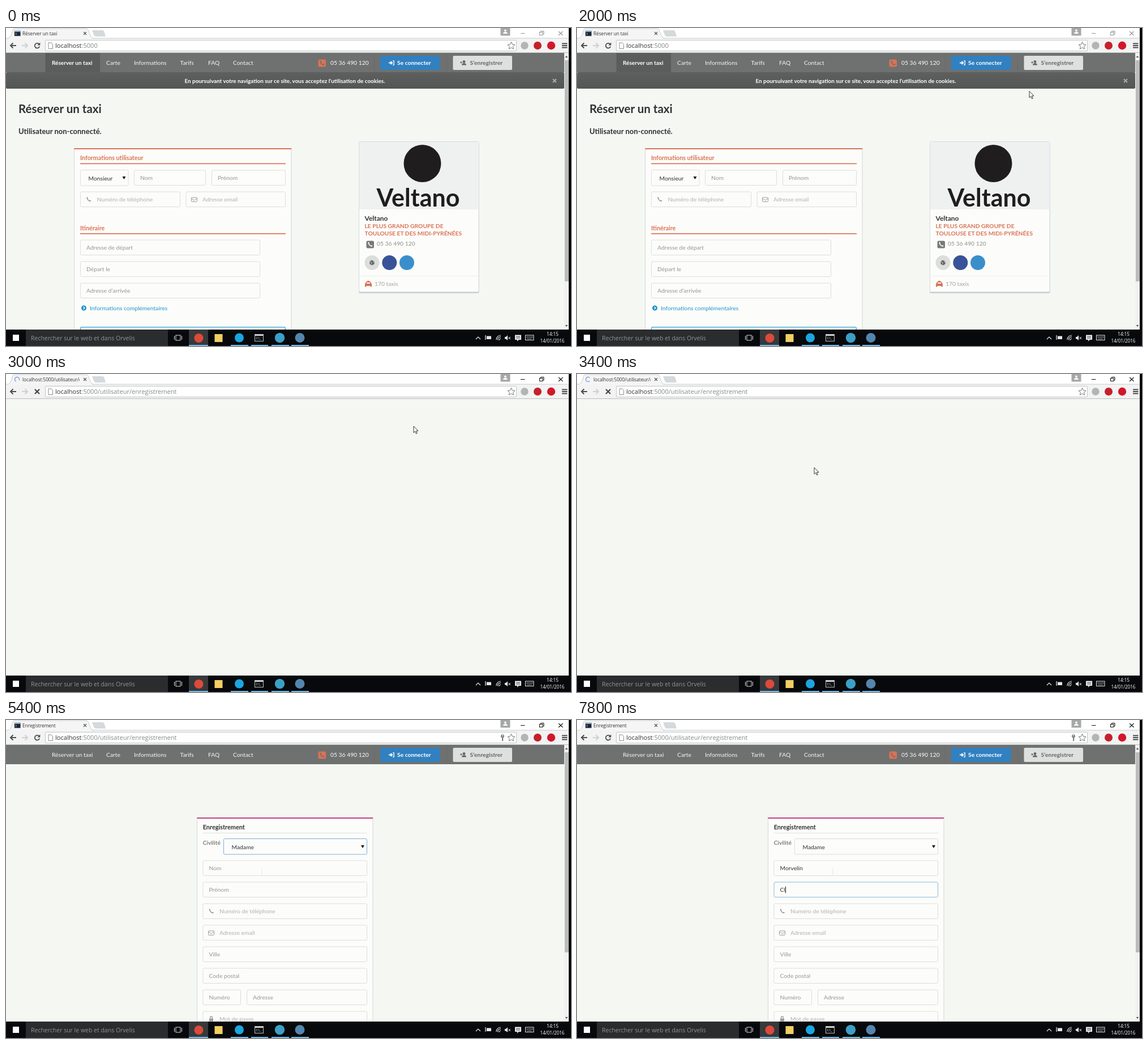
Animation, 998 px wide and 561 px high, one loop 8000 ms. Source, as an HTML page:

```html
<!DOCTYPE html>
<html lang="fr">
<head>
<meta charset="utf-8">
<style>
html, body { margin: 0; width: 100%; height: 100%; overflow: hidden; background: #000 }
svg { display: block; width: 998px; height: 561px }
text { font-family: Lato, sans-serif; font-size: 10.3px; white-space: pre }
.ui { font-family: "Open Sans", "Noto Sans", sans-serif }
.b { font-weight: 700 }
.m { text-anchor: middle }
.e { text-anchor: end }
</style>
</head>
<body>
<svg id="stage" viewBox="0 0 998 561">
  <defs>
    <clipPath id="view"><rect y="44" width="994" height="488"/></clipPath>
    <clipPath id="tabClip"><rect x="10" width="120" height="18"/></clipPath>
    <linearGradient id="bar" x2="0" y2="1"><stop stop-color="#5d605e"/><stop offset="1" stop-color="#535654"/></linearGradient>
  </defs>
  <g id="browser"></g>
  <g id="tools"></g>
  <g clip-path="url(#view)">
    <g id="booking"></g>
    <g id="register"></g>
    <g id="nav"></g>
    <g id="live"></g>
  </g>
  <g id="taskbar"></g>
  <g id="pointer"></g>
</svg>
<script>
const $ = id => document.getElementById(id);
const CORAL = '#da7257', PAGE = '#f5f7f3', PALE = '#fcfdfa', INK = '#2f3133';
const PHONE = '05 36 490 120', BRAND = 'Veltano', SURNAME = 'Morvelin';

// Drawing helpers, each returning SVG markup
const rect = (x, y, w, h, fill, more = '') =>
  `<rect x="${x}" y="${y}" width="${w}" height="${h}" fill="${fill}" ${more}/>`;
const disc = (x, y, r, fill) => `<circle cx="${x}" cy="${y}" r="${r}" fill="${fill}"/>`;
const line = (d, color, w = 1, more = '') =>
  `<path d="${d}" fill="none" stroke="${color}" stroke-width="${w}" ${more}/>`;
const shape = (d, fill, more = '') => `<path d="${d}" fill="${fill}" ${more}/>`;
const text = (x, y, s, fill = INK, cls = '', size = 10.3) =>
  `<text x="${x}" y="${y}" fill="${fill}" class="${cls}" style="font-size:${size}px">${s}</text>`;
const at = (x, y, s) => `<g transform="translate(${x} ${y})">${s}</g>`;
const box = (x, y, w, h = 27.5, stroke = '#dcdedd', fill = PALE) =>
  rect(x + .5, y + .5, w - 1, h - 1, fill, `rx="2" stroke="${stroke}"`);

const icons = {
  phone: c => line('M-2.8 -3.2Q-2 2 3.2 2.8', c, 1.5) +
    line('M-3.6 -2.6L-1.6 -3.2M2.6 3.5L3.2 1.5', c, 2.2),
  mail: c => rect(-5, -3.5, 10, 7.5, 'none', `rx="1" stroke="${c}"`) + line('M-5 -2L0 1.5L5 -2', c),
  lock: c => rect(-3.5, -1, 7, 5, c, 'rx=".6"') + line('M-2 -1V-2.5a2 2 0 0 1 4 0V-1', c, 1.3),
  login: c => line('M-5 0H1M-1.5 -2.7L1.3 0L-1.5 2.7', c, 1.8) + line('M2 -3.7H4.2V3.7H2', c, 1.3),
  addUser: c => disc(-1, -2, 2.4, c) + shape('M-5 4Q-5 .5 -1 .5T3 4Z', c) + line('M-6 -2.5V1M-7.7 -.8H-4.2', c, 1.3),
  arrow: c => shape('M-3 -2H3L0 3Z', c)
};
const icon = (name, x, y, c) => at(x, y, icons[name](c));

function field(x, y, w, label, sign) {
  return box(x, y, w) + (sign ? icon(sign, x + 15, y + 14, '#9a9c9b') : '') +
    text(x + (sign ? 29.5 : 11), y + 17.4, label, sign ? '#b0b2b1' : '#959796');
}
function select(x, y, w, value, stroke) {
  return box(x, y, w, 28.5, stroke) + text(x + 14.5, y + 18.7, value) + icon('arrow', x + w - 8, y + 14, '#111');
}
function card(x, y, w, h, top) {
  return rect(x + .5, y + .5, w - 1, h, PALE, 'rx="2" stroke="#d3d6d5"') + rect(x, y, w, 2, top, 'rx="1"');
}
const heading = (y, s) => text(131, y, s, CORAL, 'b', 10.7) + rect(131, y + 5.5, 363, 1.7, CORAL);
const phoneTile = (x, y, c, sign) => rect(x, y, 13.5, 13, c, 'rx="2.5"') + icon('phone', x + 6.7, y + 6.5, sign);

function drawBrowser() {
  return rect(0, 0, 994, 44, '#fff') + rect(0, 18, 994, 26, '#f2f3f2') +
    line('M0 18H994', '#c9cccb') + line('M0 43.5H994', '#b9bcba') +
    shape('M152 4H170Q173 4 174 8L176 15H159Q156 15 155 12Z', '#d4d9dc') +
    shape('M4 18.5Q8 17 10 10L12 3Q13 1 16 1H141Q144 1 145 3L149 13Q151 18 154 18.5Z', '#f4f5f4', 'stroke="#bfc2c1" stroke-width=".8"') +
    rect(4, 18, 149, 2, '#f3f4f3') +
    line('M137 7L142 12M142 7L137 12', '#555', 1.2) +
    line('M18 31H8M12.5 26.5L8 31L12.5 35.5', '#4b4d4c', 2) +
    line('M28 31H38M33.5 26.5L38 31L33.5 35.5', '#cfd1d0', 2) +
    rect(69.5, 21.5, 832, 19, '#fff', 'rx="1.5" stroke="#c2c5c4"') +
    shape('M75 26H80L82.5 28.5V36.5H75Z', '#fff', 'stroke="#8a8c8b"') +
    shape('M892.5 24.5L894.5 29L899 29.4L895.6 32.5L896.6 37L892.5 34.6L888.4 37L889.4 32.5L886 29.4L890.5 29Z', '#fff', 'stroke="#777"') +
    disc(916, 31, 6.7, '#b3b5b4') + disc(939, 31, 7, '#c5202b') + disc(963, 31, 7.2, '#d3172a') +
    line('M982 27.5H991.5M982 31H991.5M982 34.5H991.5', '#4a4c4b', 2) +
    rect(873.5, 0, 17, 13.5, '#a5a8a7') + disc(882, 4.5, 2, '#fff') + shape('M878 10Q878 7 882 7T886 10Z', '#fff');
}

function drawNav() {
  const items = [[81, 'Réserver un taxi'], [177, 'Carte'], [226, 'Informations'], [307.5, 'Tarifs'], [357, 'FAQ'], [401, 'Contact']];
  return rect(0, 44, 986, 34, '#6e716f') +
    items.map(([x, s]) => text(x, 65, s, '#f5f6f5')).join('') + '<g id="active"></g>' +
    line('M778.5 44V78M650.5 44V78', '#696c6a') +
    phoneTile(551.5, 55.5, CORAL, '#6e716f') + text(573, 65, PHONE, '#fff') +
    rect(661, 49, 105.5, 25, '#3180c0', 'rx="2"') + icon('login', 681, 61.5, '#fff') +
    text(691, 65, 'Se connecter', '#fff', 'b') + '<g id="signup"></g>' +
    rect(986, 44, 8, 488, '#f0f1f0') + shape('M987.5 52L990 49L992.5 52Z', '#555') +
    shape('M987.5 524L990 527L992.5 524Z', '#555') + '<g id="thumb"></g>';
}

function drawBooking() {
  const notice = 'En poursuivant votre navigation sur ce site, vous acceptez l’utilisation de cookies.';
  return rect(0, 78, 986, 29, 'url(#bar)', 'rx="2"') + text(492.5, 96.5, notice, '#fff', 'b m', 9.9) +
    line('M966 90L972 96M972 90L966 96', '#a9acaa', 2) +
    text(22, 149.5, 'Réserver un taxi', INK, 'b', 20.5) +
    text(22, 186.5, 'Utilisateur non-connecté.', INK, 'b', 13) +
    card(120, 212, 384.5, 340, CORAL) + heading(233, 'Informations utilisateur') +
    select(131, 250, 85.5, 'Monsieur') +
    field(226, 250.5, 127, 'Nom') + field(363, 250.5, 131, 'Prénom') +
    field(131, 288.5, 177, 'Numéro de téléphone', 'phone') + field(317.5, 288.5, 176.5, 'Adresse email', 'mail') +
    heading(356.5, 'Itinéraire') +
    ['Adresse de départ', 'Départ le', 'Adresse d’arrivée'].map((s, i) => field(131, 373.5 + 38 * i, 318, s)).join('') +
    disc(137.5, 494, 4.5, '#1f93cc') + line('M136.5 491.7L139 494L136.5 496.3', '#fff', 1.3) +
    text(148, 497.5, 'Informations complémentaires', '#1f93cc') +
    rect(131.7, 527.7, 361.6, 25, PALE, 'rx="2" stroke="#4fb0dc" stroke-width="1.6"') +
    rect(623, 202, 212.5, 266, '#cbd0d6', 'rx="2"') + rect(623.5, 200.5, 211.5, 265, PALE, 'rx="2" stroke="#d5dae0"') +
    rect(624, 201, 210.5, 119, '#eff1f1') + disc(735.5, 239, 33, '#1f1d1e') +
    text(728, 315, BRAND, '#1f1d1e', 'b m', 43) +
    text(633.5, 340, BRAND, INK, 'b', 12) +
    text(633.5, 353, 'LE PLUS GRAND GROUPE DE', CORAL, 'b') + text(633.5, 366, 'TOULOUSE ET DES MIDI-PYRÉNÉES', CORAL, 'b') +
    phoneTile(636.5, 375.5, '#777a78', '#fff') + text(655, 384, PHONE, '#8d8f8e') +
    disc(646.5, 414, 13, '#dbdedb') + disc(646.5, 414, 4.3, '#606361') +
    line('M643 413Q646 411 646 417M648 410.5L650 414', '#dbdedb') +
    disc(677.3, 414, 13, '#39539a') + disc(708, 414, 13, '#3a8fcb') +
    line('M624 437.5H834.5', '#edefed') +
    shape('M634 456.5V451.5L636.5 447.5H638V446H642V447.5H643.5L646 451.5V456.5H643.5V455H636.5V456.5Z', CORAL) +
    rect(637, 449, 6, 2, PALE) + text(651, 455.2, '170 taxis', '#a3a5a4');
}

function drawRegister() {
  const rows = [['Numéro de téléphone', 'phone'], ['Adresse email', 'mail'], ['Ville'], ['Code postal']];
  return card(337, 172, 311.5, 380, '#c4437d') + text(347.7, 192.7, 'Enregistrement', INK, 'b', 10.9) +
    line('M348 199.5H638', '#dfe1e0') + text(347.7, 220, 'Civilité', '#555') +
    rows.map(([s, sign], i) => field(347.5, 323.5 + 38 * i, 290.5, s, sign)).join('') +
    field(347.5, 475.5, 67.5, 'Numéro') + field(425, 475.5, 213, 'Adresse') +
    field(347.5, 513.5, 290.5, 'Mot de passe', 'lock');
}

function drawTaskbar() {
  const running = [[323, 34], [397, 31], [433, 30], [469, 31], [504, 31]];
  const tray = '#e8e8e8';
  return rect(0, 532, 998, 29, '#07090c') + rect(35, 532, 251, 29, '#2a2c2e') + rect(12, 541, 11, 11, '#fff') +
    text(44, 550.8, 'Rechercher sur le web et dans Orvelis', '#929594', 'ui', 10.5) +
    rect(300, 542, 8, 9, 'none', 'stroke="#ddd"') + line('M297.5 543V550M310.5 543V550', '#ddd') +
    rect(323, 532, 34, 29, '#37393a') +
    running.map(([x, w]) => rect(x, 559, w, 2, '#72b8e6')).join('') +
    disc(340.5, 547, 8, '#dc4a3c') + rect(368.5, 540, 14, 14, '#f3cf62') + disc(412, 546.5, 8, '#1ba6e0') +
    rect(439.5, 540.5, 15, 12, '#101214', 'stroke="#b9bcbb"') + rect(440, 541, 14, 2, '#d7d9d8') +
    text(441.5, 549, 'C:\\_', '#eee', 'ui', 5) +
    disc(483.5, 546.5, 8.7, '#3c9fc6') + disc(519, 546.5, 8.5, '#5585ac') +
    line('M830 549L834 545L838 549', tray, 1.2) +
    rect(849, 543.5, 8, 5.5, tray) + line('M847 542V550', tray, 1.3) +
    line('M866 550A8 8 0 0 1 874 542M868.5 550.5A5 5 0 0 1 874 545M871 551A3 3 0 0 1 874 548', tray, 1.2) +
    shape('M881 545H883L886 542V551L883 548.5H881Z', tray) + line('M887.5 545L891 549M891 545L887.5 549', tray) +
    shape('M899 541.5H910V550H905.5L903 553V550H899Z', tray) + line('M901 544.5H908M901 547H908', '#222', .8) +
    rect(917.5, 542, 14.5, 8.5, 'none', `stroke="${tray}"`) +
    line('M919.5 544.5H930.5M919.5 546.5H930.5M921 548.5H929', tray, 1, 'stroke-dasharray="1 1"') +
    text(965.5, 543, '14:15', '#fff', 'ui m', 8.3) + text(965, 555, '14/01/2016', '#fff', 'ui m', 8.1);
}

function drawTools(t) {
  const loading = t >= 2600 && t < 3800, second = t >= 2600, control = t < 2400 ? '#929594' : '#111';
  const title = loading ? 'localhost:5000/utilisateur/e' : second ? 'Enregistrement' : 'Réserver un taxi';
  const route = second ? '/utilisateur/enregistrement' : '';
  const turn = t < 3000 ? -t / 4 : (t - 3400) * .72;
  const spinner = t === 2600 ? rect(18, 4.5, 2.5, 1.2, '#8b96a8') :
    at(19.5, 9.5, line('M2.8 -2.9A4 4 0 1 0 2.8 2.9', t < 3000 ? '#9aa0aa' : '#7b9ae0', 1.4, `transform="rotate(${turn})"`));
  const terminal = rect(15, 5, 10.5, 9, '#17273a', 'stroke="#777" stroke-width=".6"') +
    rect(15, 5, 10.5, 2, '#89a8c8') + line('M17 9L18.5 10.2L17 11.5', '#fff', .8);
  return (loading ? spinner : terminal) +
    `<g clip-path="url(#tabClip)">${text(29, 12.6, title, '#333', 'ui', 8.2)}</g>` +
    (loading ? line('M51 27L59 35M59 27L51 35', '#444', 2.2) :
      line('M58.8 29A4.3 4.3 0 1 0 59.2 32.5', '#4b4d4c', 1.8) + shape('M60.3 25.5V30.5H55.3Z', '#4b4d4c')) +
    text(87, 35, `localhost<tspan fill="#858887">:5000${route}</tspan>`, '#333', 'ui', 11.1) +
    (t >= 3800 ? disc(877, 28.5, 3, '#7c7f7d') + rect(876, 31, 2.2, 6, '#7c7f7d') + disc(877, 27.7, 1, '#fff') : '') +
    line('M909 9.5H916.5', control) + rect(942.5, 7.5, 5.5, 5, 'none', `stroke="${control}"`) +
    line('M944.5 7V5.5H950V11H948.5', control) + line('M976 6L983.5 13M983.5 6L976 13', control, 1.1);
}

function suggestions(y, name, notes) {
  const h = notes.length * 17.6 + 19;
  const base = i => y + 13 + 17.6 * i;
  const sep = base(notes.length) - 12;
  return rect(347.5, y + .5, 290, h, '#fff', 'stroke="#b4c0d4"') +
    notes.map((s, i) => text(350, base(i), name, '#222', 'ui', 8.2) + text(635, base(i), s, '#7b7e7d', 'ui e', 6.7)).join('') +
    line(`M348 ${sep}H638`, '#666', .9) +
    text(350, base(notes.length), 'Paramètres de saisie automatique de Lumbro…', '#222', 'ui', 8.2);
}

function entry(y, label, value, focused, caretX) {
  return box(347.5, y, 290.5, 27.5, focused ? '#8ab9da' : '#dcdedd') +
    text(358.5, y + 17.4, value || label, value ? INK : focused ? '#777' : '#959796') +
    (focused ? rect(caretX, y + 8, 1, 12, '#222') : '');
}

function drawForm(t) {
  const typed = SURNAME.slice(0, Math.max(0, Math.min(8, (t - 6000) / 100)));
  const given = t >= 7800 ? 'Cl' : t >= 7400 ? 'C' : '';
  const nameFocus = t >= 5600 && t < 7000;
  const notes = ['Impasse Émile Corvadet, morvelin.clara@example.fr', '118 Rue Basile Tourvenne',
    'Impasse Émile Corvadet, claramor@example.fr', 'Rue Basile Tourvenne'];
  const open = t >= 5000 && t < 5400;
  let s = select(384, 209, 254, t < 5400 ? 'Monsieur' : 'Madame', t >= 4800 && t < 5600 ? '#83aade' : undefined) +
    entry(247.5, 'Nom', typed, nameFocus, 358.5 + typed.length * 5.3) +
    entry(285.5, 'Prénom', given, t >= 7000, 358.5 + (given.length > 1 ? 9.5 : given.length * 6.8));
  if (t >= 6200 && t < 7000) s += suggestions(276, SURNAME, notes);
  if (t === 7400 || t === 7600) s += suggestions(314, 'Clara', notes);
  if (open) {
    const pick = t < 5200 ? 0 : 1;
    s += rect(384.5, 237.5, 253, 36, '#fff', 'stroke="#83aade"') + rect(385, 238 + pick * 17.5, 252, 17.5, '#3d8edb') +
      ['Monsieur', 'Madame'].map((v, i) => text(398.5, 250.5 + i * 17.5, v, i === pick ? '#fff' : INK)).join('');
  }
  return t >= 5400 ? s + line('M452 262V273', '#e4e7e4') : s;
}

// Pointer path: time, x, y
const path = [[200, 720, 470], [600, 632, 355], [800, 620, 341], [1200, 620, 341], [1800, 760, 160], [2200, 838, 63],
  [2800, 838, 63], [3000, 720, 92], [3400, 419, 165], [3800, 425, 192], [4600, 452, 222], [5000, 452, 226], [5200, 452, 264]];
function drawPointer(t) {
  if (t < 200 || t >= 5400) return '';
  const i = Math.max(1, path.findIndex(p => p[0] >= t));
  const [a, b] = [path[i - 1], path[i]];
  const k = (t - a[0]) / (b[0] - a[0]);
  const x = a[1] + (b[1] - a[1]) * k, y = a[2] + (b[2] - a[2]) * k;
  const hand = 'M0 0Q1.5 -1 2.5 0V6L8 7.5Q9 8 8.5 10L7.5 15H1.5L-3 9.5Q-3 7.5 0 9Z';
  const arrow = 'M0 0V11.5L2.7 9L4.5 13.3L6.3 12.5L4.5 8.3H8Z';
  return at(x, y, shape(t >= 2200 && t <= 2800 ? hand : arrow, '#fff', 'stroke="#222" stroke-width=".9"'));
}

function show(id, on) { $(id).style.display = on ? '' : 'none'; }

function render(t) {
  const first = t < 3000, loaded = t >= 3800, hover = t >= 2200 && first;
  show('booking', first);
  show('register', loaded);
  show('nav', first || loaded);
  $('tools').innerHTML = drawTools(t);
  $('active').innerHTML = first ? rect(69.5, 44, 96.5, 34, '#5a5d5b') + text(81, 65, 'Réserver un taxi', '#fff', 'b', 10) : '';
  const ink = hover ? '#3f4241' : '#646766';
  $('signup').innerHTML = rect(789.5, 49, 104.5, 25, hover ? '#cdd0cf' : '#dde0de', 'rx="2"') +
    icon('addUser', 810, 61.5, ink) + text(819.5, 65, 'S’enregistrer', ink, 'b');
  $('thumb').innerHTML = rect(987, 57, 7, first ? 390 : 353, '#b9bcba');
  $('live').innerHTML = loaded ? drawForm(t) : hover ?
    rect(-1, 516.5, 331.5, 17, '#e2e4e2', 'rx="2" stroke="#c4c7c5"') +
    text(2, 527.5, 'localhost:5000/utilisateur/enregistrement', '#777a78', 'ui', 8.2) : '';
  $('pointer').innerHTML = drawPointer(t);
}

$('browser').innerHTML = rect(0, 0, 994, 532, PAGE) + drawBrowser();
$('nav').innerHTML = drawNav();
$('booking').innerHTML = drawBooking();
$('register').innerHTML = drawRegister();
$('taskbar').innerHTML = drawTaskbar();

const STEP = 200, LOOP = 8000;
let shown = -1;
function tick() {
  const t = Math.floor(performance.now() % LOOP / STEP) * STEP;
  if (t !== shown) render(shown = t);
  requestAnimationFrame(tick);
}
tick();
</script>
</body>
</html>
```
